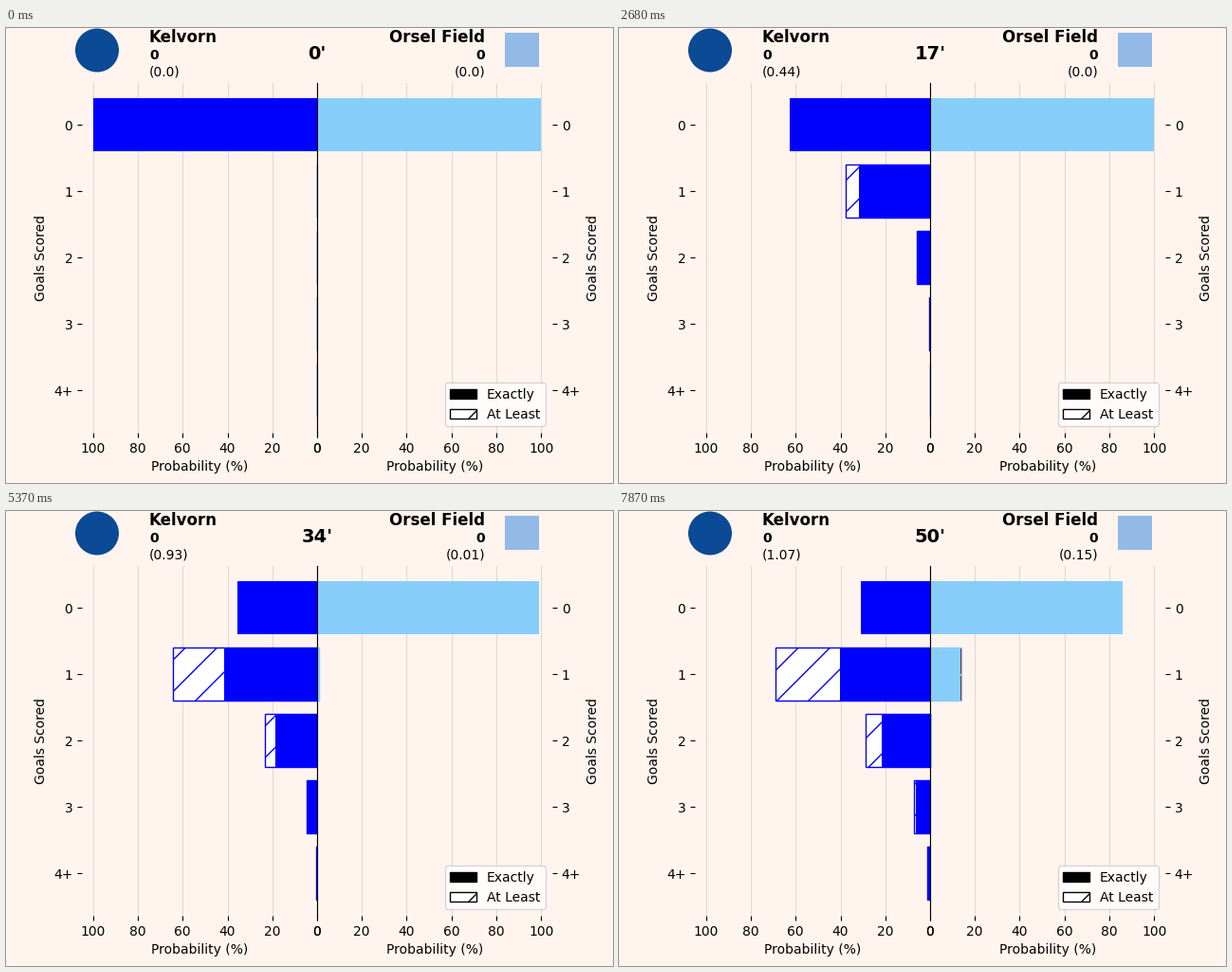
Recreate the animation shown at these times as a matplotlib script. Size 640 by 480 pixels, loop 8000 ms.

```python
import matplotlib.pyplot as plt
from matplotlib.animation import FuncAnimation
from matplotlib.patches import Circle, Patch, Rectangle

W, H, DPI = 640, 480, 100
LOOP, INTERVAL = 8000, 25
HOLD, STEP, STEPS = 160, 30, 5
BACKGROUND = "seashell"
ROWS = range(5)

# Chances per side: minute -> scoring probability
HOME = {4: .05, 7: .16, 9: .054, 16: .172, 31: .28, 33: .21,
        39: .02, 43: .02, 46: .06, 48: .04}
AWAY = {25: .009, 35: .063, 49: .074}


def locate(t):
    """Return the match minute and the progress within that minute."""
    minute, start = 0, 0
    while True:
        moving = minute in HOME or minute in AWAY
        length = STEP * STEPS if moving else HOLD
        if t < start + length:
            step = (t - start) // STEP + 1 if moving else STEPS
            return minute, step / STEPS
        start += length
        minute += 1


def goal_odds(chances, minute, progress):
    """Return expected goals, exact odds and at-least odds in percent."""
    taken = [p * (progress if m == minute else 1)
             for m, p in chances.items() if m <= minute]
    odds = [100.0, 0, 0, 0, 0]
    for p in taken:
        scored = [p * o for o in odds]
        odds = [(1 - p) * o for o in odds]
        for k in range(4):
            odds[k + 1] += scored[k]
        odds[4] += scored[4]
    return sum(taken), odds, [sum(odds[k:]) for k in ROWS]


class Side:
    def __init__(self, ax, name, chances, color, second, x, align):
        self.chances = chances
        rows = ROWS[1:]
        self.at_least = ax.barh(rows, [0] * 4, color=second, edgecolor=color,
                                hatch="/", zorder=2)
        self.exact = ax.barh(ROWS, [0] * 5, color=color, zorder=2.1)
        label(x, 15, name, 12, align, "bold")
        label(x, 33, "0", 10, align, "bold")
        self.expected = label(x, 50, "", 10, align)

    def update(self, minute, progress):
        total, exact, at_least = goal_odds(self.chances, minute, progress)
        self.expected.set_text(f"({round(float(total), 2)})")
        for bar, width in zip(self.exact, exact):
            bar.set_width(width)
        for bar, width in zip(self.at_least, at_least[1:]):
            bar.set_width(width)


def label(x, baseline, text, size, align, weight="normal"):
    return fig.text(x / W, 1 - baseline / H, text, fontsize=size, ha=align,
                    va="baseline", weight=weight)


def style(ax, xlim, spine):
    ax.set_facecolor(BACKGROUND)
    ax.set(xlim=xlim, ylim=(4.64, -.64), xlabel="Probability (%)",
           ylabel="Goals Scored", xticks=range(0, 101, 20))
    ax.set_yticks(ROWS, ["0", "1", "2", "3", "4+"])
    ax.set_axisbelow(True)
    ax.grid(axis="x", alpha=.4)
    for side in ax.spines:
        ax.spines[side].set_visible(side == spine)


plt.rcParams["font.family"] = "DejaVu Sans"
fig, (left, right) = plt.subplots(1, 2, figsize=(W / DPI, H / DPI), dpi=DPI,
                                  facecolor=BACKGROUND)
fig.subplots_adjust(left=.125, right=.9, bottom=.11, top=.88, wspace=0)
home = Side(left, "Kelvorn", HOME, "blue", "white", 151, "left")
away = Side(right, "Orsel Field", AWAY, "lightskyblue", "darkred", 505, "right")
style(left, (105, 0), "right")
style(right, (0, 105), "left")
right.yaxis.tick_right()
right.yaxis.set_label_position("right")
right.legend(handles=[
    Patch(facecolor="black", edgecolor="black", label="Exactly"),
    Patch(facecolor="white", edgecolor="black", hatch="/", label="At Least"),
], loc="lower right")

# Plain club badges, in pixels from the bottom left
fig.add_artist(Circle((96, H - 23.5), 23, color="#0b4a94", lw=0, transform=None))
fig.add_artist(Rectangle((526, H - 41), 36, 36, color="#93b9e6", lw=0,
                         transform=None))
clock = label(328, 33, "", 14, "center", "bold")


def update(frame):
    minute, progress = locate((frame + 1) * INTERVAL - 1)
    clock.set_text(f"{minute}'")
    home.update(minute, progress)
    away.update(minute, progress)
    return []


anim = FuncAnimation(fig, update, frames=LOOP // INTERVAL, interval=INTERVAL,
                     repeat=True, repeat_delay=0)
plt.show()
```
